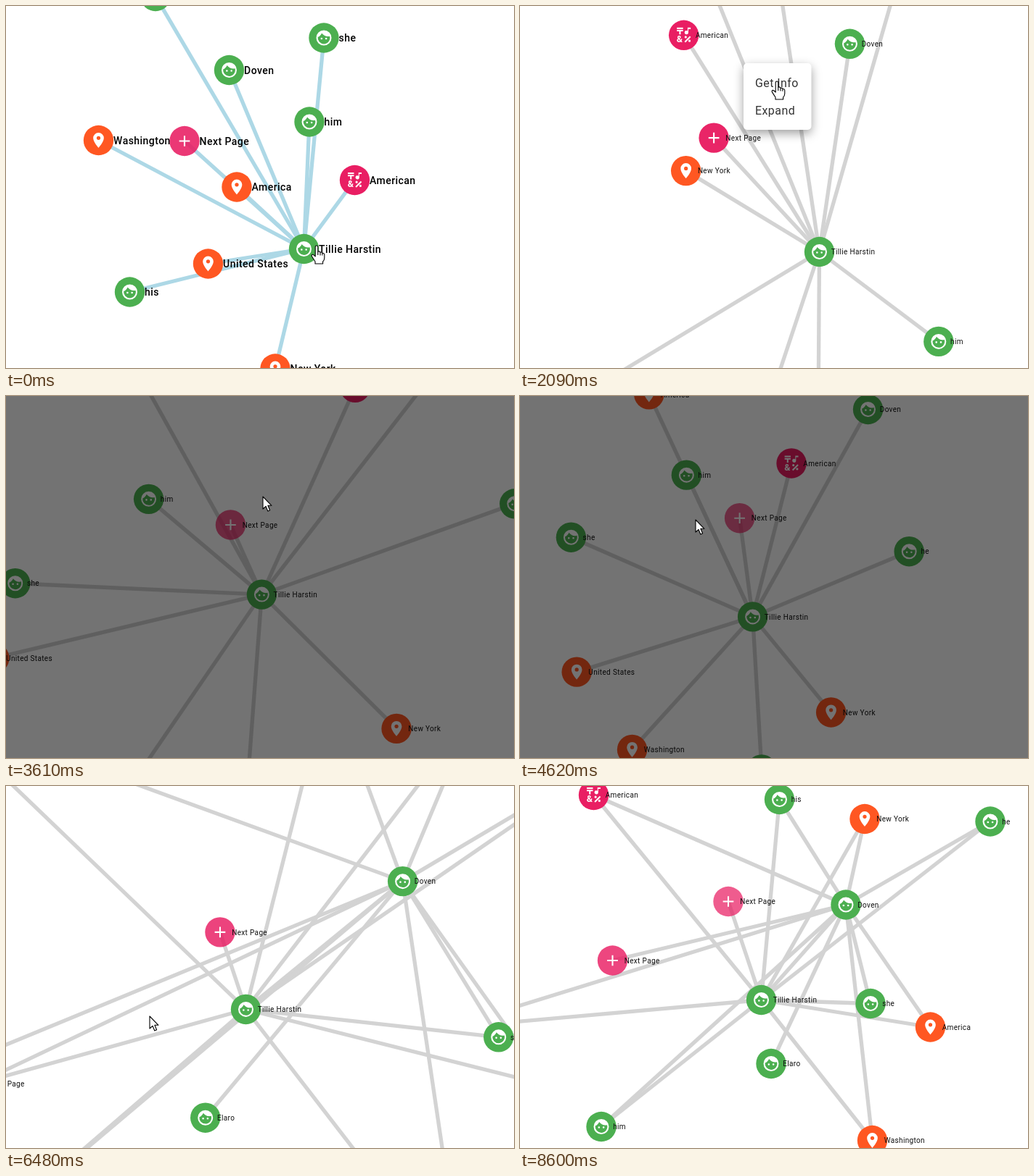
These frames come from a looping animation (700 px wide and 500 px high, 8700 ms). An HTML page with a canvas:

```html
<!DOCTYPE html>
<html lang="en">
<head>
<meta charset="utf-8">
<title>Relationship graph</title>
<style>
  html, body { margin: 0; width: 100%; height: 100%; overflow: hidden; background: #fff; }
  canvas { display: block; width: 700px; height: 500px; }
</style>
</head>
<body>
<canvas id="stage" width="700" height="500"></canvas>
<script>
const ctx = document.getElementById('stage').getContext('2d');
const LOOP = 8700;
const OPENED = 1850, LOADING = 3130, EXPANDED = 6080;
const FONT = 'Roboto, sans-serif';

const GREEN = '#4caf50', ORANGE = '#ff5722', PINK = '#e91e63';
const node = (label, color, icon) => ({ label, color, icon });
const person = label => node(label, GREEN, 'face');
const place = label => node(label, ORANGE, 'pin');

const nodes = {
  he: person('he'), she: person('she'), him: person('him'), his: person('his'),
  rival: person('Doven'),
  dc: place('Washington'), usa: place('America'), us: place('United States'), ny: place('New York'),
  amer: node('American', PINK, 'symbols'),
  hub: person('Tillie Harstin'),
  former: person('Elaro'),
  next: node('Next Page', PINK, 'plus'),
  more: node('Next Page', PINK, 'plus')
};
const ids = Object.keys(nodes);
const added = ['former', 'more'];
const hubLinks = ids.filter(id => id !== 'hub' && !added.includes(id)).map(id => ['hub', id]);
const rivalLinks = ids.filter(id => !['hub', 'rival', 'next'].includes(id)).map(id => ['rival', id]);

// Poses: x, y and, for the paging nodes, opacity.
const rest = {
  hub: [410.5, 335.5], he: [206, -13.5], she: [438, 44], rival: [307.5, 88.5], him: [418, 160],
  dc: [127.5, 185.5], next: [246, 186.5, 1], usa: [318, 250], amer: [480.5, 240.5],
  us: [278.5, 356], his: [170.5, 395], ny: [371, 501]
};
const spread = {
  hub: [412.5, 339.5], he: [533, -80], she: [243, -80], rival: [454.5, 52], him: [577, 463.5],
  dc: [336, 570], next: [267, 182, .97], usa: [350, -80], amer: [225.5, 40],
  us: [65, 550], his: [411, 570], ny: [228.5, 227.5]
};
const wide = {
  hub: [352.5, 274], he: [701.5, 148.5], she: [12.5, 259], rival: [611, -60], him: [196.5, 142.5],
  dc: [157, 560], next: [309.5, 178, .74], usa: [167, -60], amer: [481.5, -12],
  us: [-16.5, 362], his: [331, 560], ny: [538.5, 459.5]
};
const settled = {
  hub: [320, 305.5], he: [533, 216], she: [71.5, 194], rival: [477, 20], him: [230, 108.5],
  dc: [154.5, 487], next: [302.5, 168.5, .7], usa: [178, -1], amer: [372, 95],
  us: [80, 381.5], his: [333, 515], ny: [426.5, 436.5]
};
const burst = {
  hub: [330.5, 308.5], he: [837, -41], she: [679.5, 347], rival: [547, 131.5], him: [-30, 620],
  dc: [631, 699], next: [295, 202, .83], usa: [748, 414], amer: [-98, -104],
  us: [-321, 490], his: [445, -147], ny: [644, -100], former: [274.5, 458.5], more: [-40, 411.5, .85]
};
const near = {
  hub: [333.5, 296], he: [653, 47], she: [488.5, 300], rival: [451.5, 165], him: [108, 475],
  dc: [488.5, 495], next: [286, 162.5, .92], usa: [567.5, 337], amer: [96.5, 14],
  us: [-102, 340], his: [360, 16], ny: [480.5, 45], former: [333, 384.5], more: [122.5, 248, .66]
};
const final = {
  hub: [332.5, 295.5], he: [648, 49], she: [483, 300.5], rival: [449, 164], him: [112, 470.5],
  dc: [485.5, 489.5], next: [287, 159.5, .72], usa: [565.5, 333], amer: [101.5, 12.5],
  us: [-99, 334], his: [357.5, 18.5], ny: [475, 45.5], former: [346, 383.5], more: [127.5, 241, .82]
};

const clamp = p => Math.max(0, Math.min(1, p));
const ramp = (t, a, b) => clamp((t - a) / (b - a));
const mix = (a, b, p) => a + (b - a) * p;

// A pose grown or shrunk around its hub.
function scaled(pose, k) {
  const [cx, cy] = pose.hub;
  return Object.fromEntries(Object.entries(pose).map(
    ([id, [x, y, alpha]]) => [id, [mix(cx, x, k), mix(cy, y, k), alpha]]));
}

const linear = p => p;
const easeOut = p => 1 - (1 - p) ** 2;
const SETTLE = 255;
const settle = (p, span) => (1 - Math.exp(-p * span / SETTLE)) / (1 - Math.exp(-span / SETTLE));

// The layout restarts from a clump, bursts outwards and settles.
const steps = [
  { t: 0, pose: rest },
  { t: OPENED, pose: rest },
  { t: OPENED, pose: scaled(spread, .1) },
  { t: 2090, pose: spread, ease: easeOut },
  { t: LOADING, pose: scaled(spread, .75), ease: settle },
  { t: LOADING, pose: scaled(wide, .1) },
  { t: 3430, pose: scaled(wide, 1.3), ease: easeOut },
  { t: 3610, pose: wide },
  { t: EXPANDED, pose: settled, ease: settle },
  { t: EXPANDED, pose: scaled(burst, .1) },
  { t: 6480, pose: burst, ease: easeOut },
  { t: 7420, pose: near, ease: settle },
  { t: 8300, pose: final, ease: easeOut }
];
const pointer = [
  [0, 428, 331], [410, 428, 331], [1200, 306, 76], [1370, 306, 76], [1440, 308, 79],
  [1850, 308, 79], [2090, 354, 104], [2600, 354, 139], [3800, 354, 139],
  [4500, 242, 171], [5500, 242, 171], [6400, 198, 318], [6600, 198, 318],
  [7420, 370, 337], [8150, 410, 525]
];

function locate(list, t, timeOf) {
  let i = 0;
  while (i < list.length - 2 && timeOf(list[i + 1]) <= t) i++;
  const a = list[i], b = list[i + 1];
  return [a, b, ramp(t, timeOf(a), timeOf(b))];
}

function poseAt(t) {
  const [a, b, p] = locate(steps, t, s => s.t);
  const k = (b.ease || linear)(p, b.t - a.t);
  const at = {};
  for (const id of ids) {
    const from = a.pose[id] || a.pose.rival, to = b.pose[id] || b.pose.rival;
    at[id] = { x: mix(from[0], to[0], k), y: mix(from[1], to[1], k), alpha: mix(from[2] ?? 1, to[2] ?? 1, k) };
  }
  if (t < 170) at.next.alpha = mix(.88, 1, ramp(t, 0, 170));
  return at;
}

const facePath = new Path2D('M9 11.75a1.25 1.25 0 1 0 0 2.5a1.25 1.25 0 1 0 0-2.5z' +
  'M15 11.75a1.25 1.25 0 1 0 0 2.5a1.25 1.25 0 1 0 0-2.5z' +
  'M12 2a10 10 0 1 0 0 20a10 10 0 1 0 0-20z' +
  'M12 20a8 8 0 0 1-7.95-8.86c2.36-1.05 4.23-2.98 5.21-5.37C11.07 8.33 14.05 10 17.42 10' +
  'c.78 0 1.53-.09 2.25-.26A8 8 0 0 1 12 20z');
const pinPath = new Path2D('M12 2a7 7 0 0 0-7 7c0 5.25 7 13 7 13s7-7.75 7-13a7 7 0 0 0-7-7z' +
  'M12 6.5a2.5 2.5 0 1 0 0 5a2.5 2.5 0 1 0 0-5z');
const symbolPath = new Path2D('M3 2h8v2H3zM3 5h8v2H8v4H6V7H3z' +
  'M15.5 11A2.5 2.5 0 0 0 18 8.5V4h3V2h-4v4.5a2.5 2.5 0 1 0-1.5 4.5z' +
  'M12.8 20.3l7.1-7.1 1.4 1.4-7.1 7.1z' +
  'M14.5 13a1.5 1.5 0 1 0 0 3a1.5 1.5 0 1 0 0-3zM19.5 18a1.5 1.5 0 1 0 0 3a1.5 1.5 0 1 0 0-3z');
const plusPath = new Path2D('M11 5h2v6h6v2h-6v6h-2v-6H5v-2h6z');
const arrowPath = new Path2D('M0 0V17L4 13.3L6.8 20L9.6 18.8L6.9 12.3H12z');
const handPath = new Path2D('M-1.8 1.8Q-1.8 0 0 0Q1.8 0 1.8 1.8V8Q4.6 7.4 5 9.2Q7.4 8.6 7.9 10.4' +
  'Q10.8 10.2 10.8 12.6V17Q10.8 20 8.6 22V25H-2V22Q-4.2 18.6-6.6 14.8Q-7.4 12.8-5.7 12.3Q-4.2 12-1.8 15z');
const handFolds = new Path2D('M1.8 8V13M5 9.2V13.4M7.9 10.4V13.6');
const iconPaths = { face: facePath, pin: pinPath, symbols: symbolPath, plus: plusPath };

function text(str, x, y, size, weight, color, spacing = .34) {
  ctx.font = `${weight} ${size}px ${FONT}`;
  ctx.letterSpacing = spacing + 'px';
  ctx.fillStyle = color;
  ctx.fillText(str, x, y);
}

function drawIcon(name, x, y) {
  ctx.save();
  ctx.translate(x, y);
  ctx.scale(1.05, 1.05);
  ctx.translate(-12, -12);
  ctx.fillStyle = '#fff';
  ctx.fill(iconPaths[name], 'evenodd');
  if (name === 'symbols') text('&', 2.6, 21.5, 12, 700, '#fff', 0);
  ctx.restore();
}

function drawGraph(t) {
  const at = poseAt(t);
  const open = t >= EXPANDED;
  const hover = t < 480 ? 'hub' : t >= 1090 && t < OPENED ? 'rival' : null;
  const links = open ? hubLinks.concat(rivalLinks) : hubLinks;
  const shown = ids.filter(id => open || !added.includes(id));
  const hot = new Set();

  ctx.lineWidth = 5.3;
  for (const [a, b] of links) {
    const lit = a === hover || b === hover;
    if (lit) hot.add(a).add(b);
    ctx.strokeStyle = lit ? '#add8e6' : '#d3d3d3';
    ctx.beginPath();
    ctx.moveTo(at[a].x, at[a].y);
    ctx.lineTo(at[b].x, at[b].y);
    ctx.stroke();
  }
  for (const id of shown) {
    const { x, y, alpha } = at[id];
    ctx.globalAlpha = alpha;
    ctx.fillStyle = nodes[id].color;
    ctx.beginPath();
    ctx.arc(x, y, 20.7, 0, Math.PI * 2);
    ctx.fill();
    ctx.globalAlpha = 1;
    drawIcon(nodes[id].icon, x, y);
  }
  for (const id of shown) {
    const { x, y } = at[id], { label } = nodes[id];
    if (hot.has(id)) text(label, x + 20.6, y + 5.3, 14, 500, '#000', .45);
    else text(label, x + 16.2, y + 3.7, 10, 400, '#111');
  }
}

function drawMenu(t) {
  const alpha = Math.min(ramp(t, OPENED, OPENED + 110), 1 - ramp(t, LOADING - 130, LOADING));
  if (alpha <= 0) return;
  ctx.save();
  ctx.globalAlpha = alpha;
  ctx.shadowColor = 'rgba(0,0,0,.38)';
  ctx.shadowBlur = 14;
  ctx.shadowOffsetY = 5;
  ctx.fillStyle = '#fff';
  ctx.beginPath();
  ctx.roundRect(308, 79, 93.5, 92, 5);
  ctx.fill();
  ctx.shadowColor = 'transparent';
  text('Get Info', 324, 112, 16, 400, '#333', .42);
  text('Expand', 324, 150, 16, 400, '#333', .42);
  ctx.restore();
}

function drawShade(t) {
  const alpha = .55 * Math.min(ramp(t, LOADING - 80, LOADING + 150), 1 - ramp(t, EXPANDED - 80, EXPANDED + 150));
  if (alpha <= 0) return;
  ctx.fillStyle = `rgba(0,0,0,${alpha})`;
  ctx.fillRect(0, 0, 700, 500);
}

function drawPointer(t) {
  const [a, b, p] = locate(pointer, t, k => k[0]);
  const hand = t < 480 || (t >= 1090 && t < LOADING - 60);
  const shape = hand ? handPath : arrowPath;
  ctx.save();
  ctx.translate(mix(a[1], b[1], p), mix(a[2], b[2], p));
  ctx.lineWidth = 1.1;
  ctx.lineJoin = 'round';
  ctx.strokeStyle = '#000';
  ctx.fillStyle = '#fff';
  ctx.fill(shape);
  ctx.stroke(shape);
  if (hand) ctx.stroke(handFolds);
  ctx.restore();
}

function render(now) {
  const t = now % LOOP;
  ctx.fillStyle = '#fff';
  ctx.fillRect(0, 0, 700, 500);
  drawGraph(t);
  drawMenu(t);
  drawShade(t);
  drawPointer(t);
}

const start = performance.now();
function tick() {
  render(performance.now() - start);
  requestAnimationFrame(tick);
}
tick();
</script>
</body>
</html>
```
